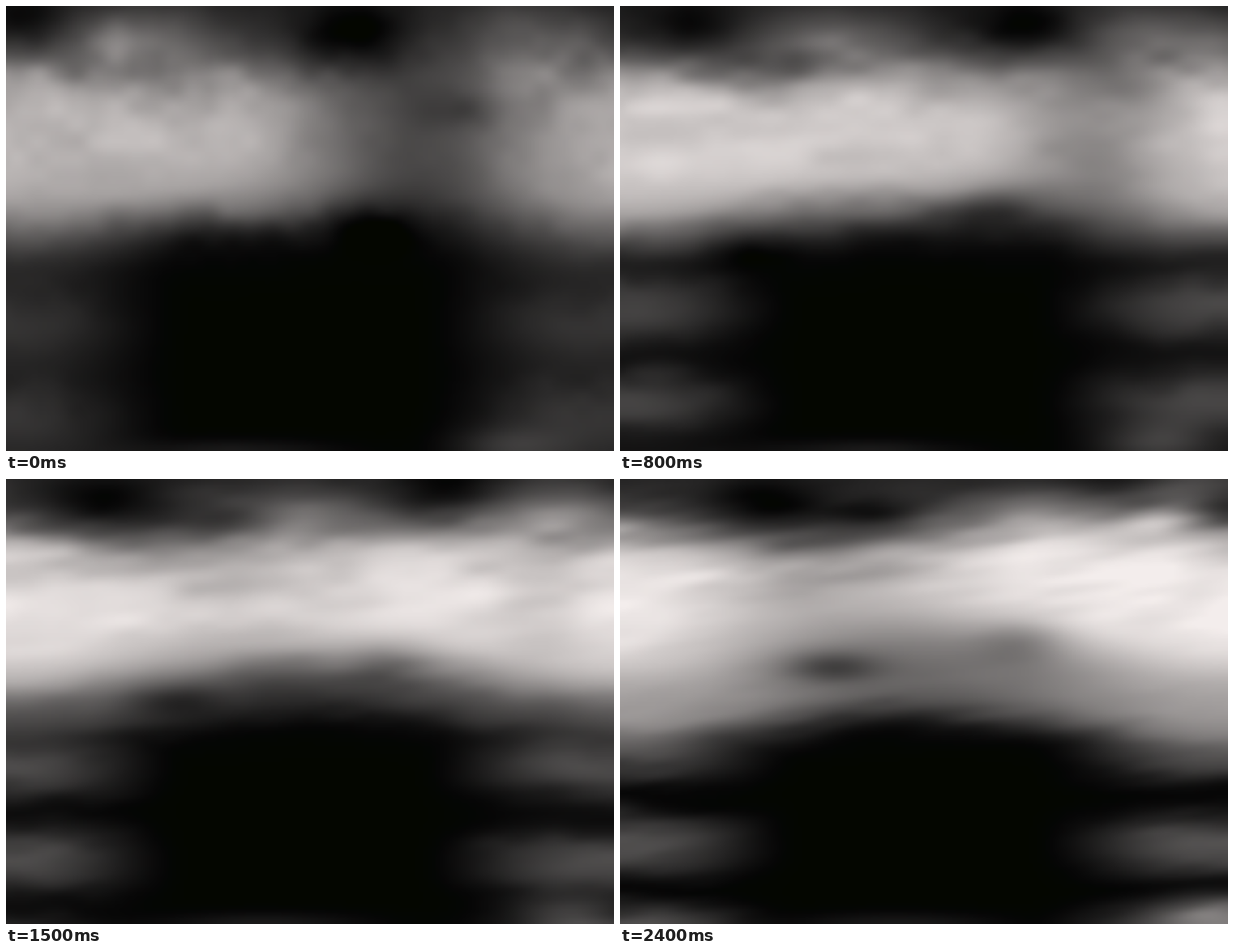
Animation of 750 by 550 pixels, one loop 2500 ms. Source, as an HTML page with a canvas:

```html
<!DOCTYPE html>
<html lang="en">
<head>
<meta charset="utf-8">
<title>Drifting clouds</title>
<style>
  html, body { margin: 0; width: 100%; height: 100%; overflow: hidden; background: #040600; }
  canvas { display: block; width: 750px; height: 550px; }
</style>
</head>
<body>
<canvas id="sky" width="750" height="550"></canvas>
<script>
const W = 750, H = 550, CELL = 5, COLS = W / CELL, ROWS = H / CELL;
const STEP = 100, STEPS = 25, TAU = Math.PI * 2;

// Drifting soft patches: x, y, drift x, drift y, radius x, radius y, strength at start and end.
const patches = [
  [150, 40, 350, 10, 85, 40, 55, 30],
  [640, 40, 50, -5, 75, 45, 45, 45],
  [430, 40, 190, -35, 70, 42, -60, -30],
  [20, 20, 165, 15, 75, 32, -35, -55],
  [200, 85, 115, -42, 65, 22, -15, -50],
  [570, 130, 175, -88, 50, 22, -20, -60],
  [110, 340, 150, -108, 60, 20, 0, -60],
  [455, 270, 40, -70, 55, 28, -30, -40],
  [620, 545, 120, -8, 70, 24, 35, 70],
  [280, 552, 60, 0, 130, 16, 28, 28]
];

const ctx = document.getElementById('sky').getContext('2d');
const small = document.createElement('canvas');
small.width = COLS;
small.height = ROWS;
const sctx = small.getContext('2d');
const img = sctx.createImageData(COLS, ROWS);

const mix = (a, b, k) => a + (b - a) * k;
const clamp = v => Math.min(1, Math.max(0, v));
const smooth = k => k * k * (3 - 2 * k);
const rise = v => 1 / (1 + Math.exp(-v));
const bell = v => Math.exp(-v * v);

function hash(x, y) {
  let n = Math.imul(x, 374761393) + Math.imul(y, 668265263);
  n = Math.imul(n ^ (n >>> 13), 1274126177);
  return ((n ^ (n >>> 16)) >>> 0) / 4294967296;
}

function noise(x, y) {
  const ix = Math.floor(x), iy = Math.floor(y);
  const kx = smooth(x - ix), ky = smooth(y - iy);
  return mix(
    mix(hash(ix, iy), hash(ix + 1, iy), kx),
    mix(hash(ix, iy + 1), hash(ix + 1, iy + 1), kx), ky) - 0.5;
}

// Everything in the scene that depends on the column only.
function column(x, p) {
  const wave = Math.cos(TAU * x / W);
  const gap = 115 * clamp(1 - p / 0.65) ** 0.6 * bell((x - 510 - 200 * p) / (145 - 100 * p));
  const dip = 55 * p * p * bell((x - 270) / 160);
  return {
    core: 187 + 105 * p - 50 * p * p - gap - dip,
    top: 84 - 24 * p + 32 * p ** 0.4 * bell((x - 200) / 160),
    base: 262 - 57 * p * p + (6 + 14 * p) * wave,
    shelf: 135 * p ** 1.8 * (1 + 0.2 * wave),
    floor: 305 + 18 * wave,
    side: smooth(clamp((Math.abs(x - 365) - 130) / 220))
  };
}

function light(c, y, p) {
  // Rolls of haze climb both sides of the dark hollow.
  const roll = Math.cos(TAU * (y - 510 + 60 * p) / 117);
  const haze = c.side * (45 + (8 + 30 * Math.sqrt(p)) * roll);
  const shelf = c.shelf * rise((c.floor - y) / 11);
  const below = Math.hypot(shelf, haze);
  const body = mix(below, c.core, rise((c.base - y) / 17));
  const sky = 35 + 0.4 * Math.min(y, 90);
  return mix(sky, body, rise((y - c.top) / 18));
}

function draw(p) {
  const cols = Array.from({ length: COLS }, (_, i) => column((i + 0.5) * CELL, p));
  const spots = patches.map(([x, y, dx, dy, rx, ry, from, to]) => ({
    gx: cols.map((_, i) => bell(((i + 0.5) * CELL - x - dx * p) / rx)),
    y: y + dy * p, ry, strength: mix(from, to, p)
  }));
  const sx = mix(48, 110, p), sy = mix(42, 24, p);
  for (let j = 0; j < ROWS; j++) {
    const y = (j + 0.5) * CELL;
    const rows = spots.map(s => s.strength * bell((y - s.y) / s.ry));
    for (let i = 0; i < COLS; i++) {
      const x = (i + 0.5) * CELL;
      const u = (x - 375 - 60 * p) / sx + 40;
      const w = (y + 0.12 * p * x) / sy + p * 1.5;
      const grain = noise(u, w) + 0.5 * noise(u * 2 + 9, w * 2 + 5);
      let v = light(cols[i], y + 16 * grain, p);
      spots.forEach((s, k) => { v += rows[k] * s.gx[i]; });
      v = Math.min(243, Math.max(0, v * (1 + 0.12 * grain)));
      const n = (j * COLS + i) * 4;
      img.data[n] = Math.max(4, v);
      img.data[n + 1] = Math.max(6, v * 0.975);
      img.data[n + 2] = v * 0.97;
      img.data[n + 3] = 255;
    }
  }
  sctx.putImageData(img, 0, 0);
  ctx.imageSmoothingQuality = 'high';
  ctx.drawImage(small, 0, 0, W, H);
}

const start = performance.now();
let shown = -1;
function tick() {
  const step = Math.floor((performance.now() - start) / STEP) % STEPS;
  if (step !== shown) {
    shown = step;
    draw(step / (STEPS - 1));
  }
  requestAnimationFrame(tick);
}
tick();
</script>
</body>
</html>
```
